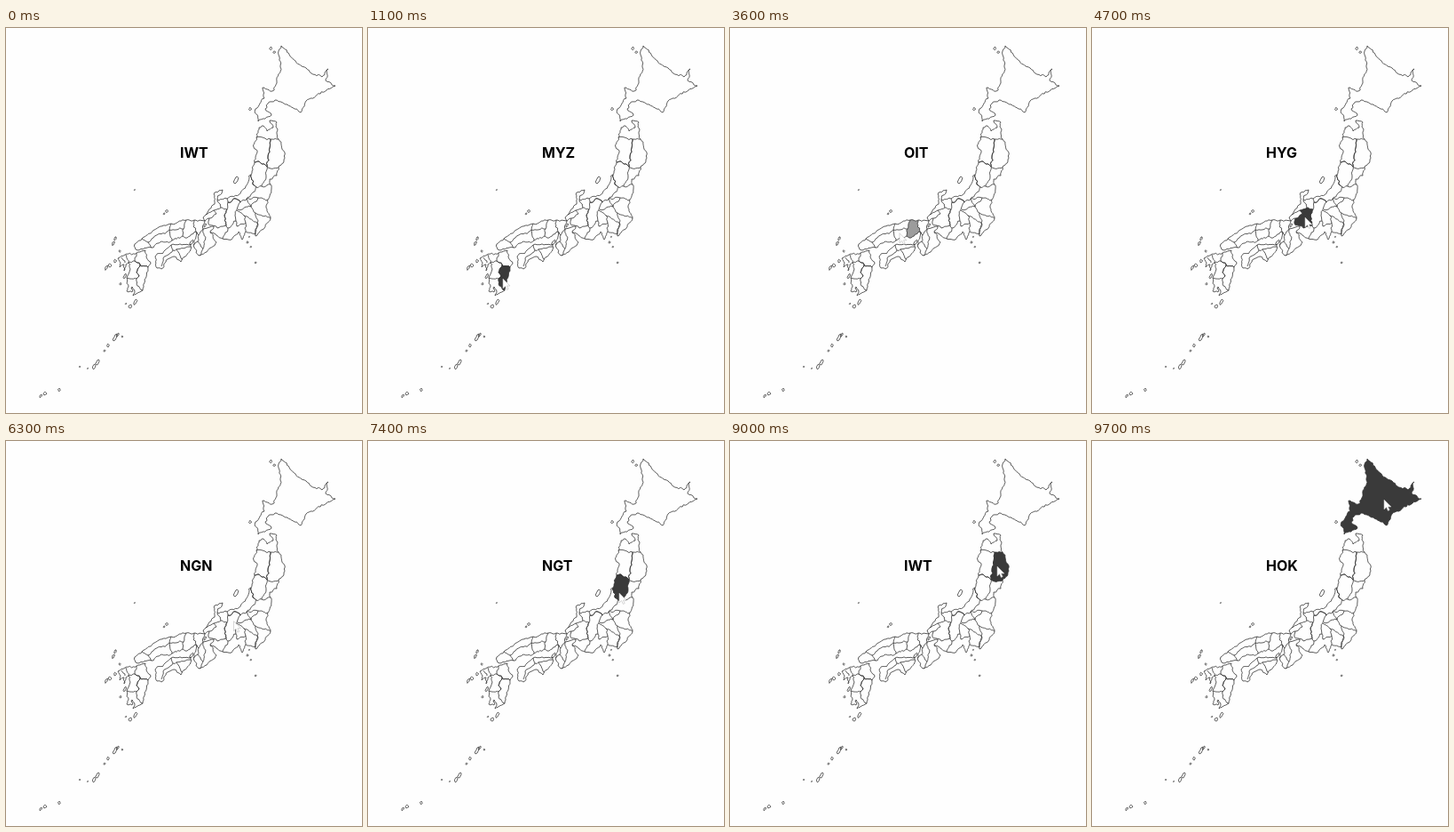
An HTML page for the animation above (10000 ms loop, 401 by 433 pixels).

```html
<!DOCTYPE html>
<html lang="en">
<head>
<meta charset="utf-8">
<title>Prefecture map</title>
<style>
  html, body { margin: 0; width: 100%; height: 100%; overflow: hidden; background: #fefefe; }
  svg { display: block; width: 401px; height: 433px; }
  .map { fill: none; stroke: #333; stroke-width: .8; stroke-linejoin: round; }
  polygon { fill: #3a3a3a; fill-opacity: 0; }
  text { font: 700 16px Inter, "Liberation Sans", sans-serif; fill: #000; }
  #cursor { fill: #fff; stroke: #bbb; stroke-width: .6; }
</style>
</head>
<body>
<svg viewBox="0 0 401 433">
  <!-- Hovered prefectures: fade in, fade out, label time, pointer tip -->
  <g class="map">
    <polygon data-on="600" data-off="1400" data-name="MYZ" data-at="1100" data-tip="152 282"
      points="151 266 160 269 154 295 148 290 147 282 150 279 147 275"/>
    <polygon data-on="1400" data-off="2400" data-name="KMT" data-at="2000" data-tip="144 270"
      points="138 264 145 262 151 266 147 275 150 279 147 282 136 281 140 271"/>
    <polygon data-on="2500" data-off="3300" data-name="OIT" data-at="3200" data-tip="152 257"
      points="147 253 157 250 158 257 163 265 160 269 151 266 145 262"/>
    <polygon data-on="3500" data-off="4200" data-name="HYG" data-at="4100" data-tip="204 222"
      points="203 216 212 216 211 220 214 229 204 236 199 234 200 226"/>
    <polygon data-on="4400" data-off="5100" data-name="GIF" data-at="4900" data-tip="240 213"
      points="234 205 242 202 249 204 246 211 248 222 238 225 228 220 229 214 237 209"/>
    <polygon data-on="5100" data-off="6100" data-name="NGN" data-at="5900" data-tip="254 208"
      points="250 196 259 192 264 196 261 201 258 211 259 217 250 225 248 222 246 211 249 204"/>
    <polygon data-on="6800" data-off="7200" data-name="NGT" data-at="7200" data-tip="265 184"
      points="276 165 270 178 264 186 249 192 250 196 259 192 264 196 271 192 280 184 282 179 278 176"/>
    <polygon data-on="7200" data-off="7700" data-name="YGT" data-at="7700" data-tip="283 171"
      points="280 151 285 150 294 156 293 167 288 178 282 179 278 176 276 165"/>
    <polygon data-on="7700" data-off="8300" data-name="AKT" data-at="8200" data-tip="288 138"
      points="282 123 298 125 297 135 295 145 294 156 285 150 280 151 283 138 279 134"/>
    <polygon data-on="8400" data-off="9300" data-name="IWT" data-at="9000" data-tip="301 141"
      points="298 125 307 125 314 140 313 150 307 157 298 158 294 156 295 145 297 135"/>
    <polygon data-on="9500" data-off="10000" data-name="HOK" data-at="9700" data-tip="329 66"
      points="307 26 310 20 326 37 344 51 356 55 363 46 360 59 371 65 361 70 338 82 332 95 317 86 303 81
      295 85 292 91 299 98 284 105 281 91 291 79 289 67 300 71 305 62 309 44"/>
  </g>
  <!-- Coasts -->
  <g class="map">
    <polyline points="307 125 304 111 305 106 297 104 301 112 294 116 290 110 285 112 282 123"/>
    <polyline points="307 157 305 166 297 170 299 181 293 202 298 214 291 225 281 234 283 219 281 232 270 229"/>
    <polyline points="270 229 266 238 262 229 254 238 244 237 230 230 237 241 226 252 217 256 212 247 214 229"/>
    <polyline points="249 192 238 193 244 182 235 185 235 198 222 213 224 217 212 216"/>
    <polyline points="203 216 186 220 172 224 153 237 145 243 146 249 164 247 172 242 187 239 199 234"/>
    <polyline points="168 257 179 250 186 244 208 243 208 249 197 263 190 257 182 260 175 271 170 270 168 257"/>
    <polyline points="136 281 138 291 136 296 142 297 142 291 145 296 143 301 154 295"/>
    <polyline points="147 253 134 255 126 259 129 264 128 269 133 266 133 273 135 266 138 264"/>
  </g>
  <!-- Inner borders -->
  <g class="map">
    <polyline points="288 178 298 176"/>
    <polyline points="271 192 284 191 295 193"/>
    <polyline points="271 192 276 201 261 204"/>
    <polyline points="284 191 276 201 281 208 298 214"/>
    <polyline points="260 205 268 211 283 219 281 208"/>
    <polyline points="268 211 270 219 260 223 259 217"/>
    <polyline points="270 219 270 229"/>
    <polyline points="250 225 244 237"/>
    <polyline points="234 223 230 230"/>
    <polyline points="238 193 242 202"/>
    <polyline points="225 210 234 205"/>
    <polyline points="229 214 224 217 222 226 217 233 216 240 222 248 218 256"/>
    <polyline points="234 223 222 226 224 239 222 248"/>
    <polyline points="214 229 217 233"/>
    <polyline points="216 240 211 244"/>
    <polyline points="200 226 184 227 186 220"/>
    <polyline points="187 239 184 227 166 236 160 241 153 237"/>
    <polyline points="160 241 164 247"/>
    <polyline points="186 244 188 250 208 246"/>
    <polyline points="175 268 177 259 188 250"/>
    <polyline points="192 249 199 260"/>
    <polyline points="135 255 138 264"/>
    <polyline points="130 258 134 264"/>
  </g>
  <!-- Islands: x y size -->
  <g class="map" id="isles">
    <g data-at="298 23 1.5, 302 27 1.4, 275 91 1.5, 259 171 4, 181 206 1.7, 178 209 1, 145 182 .6"/></g>
    <g data-at="123 237 2.6, 121 242 2.4, 128 251 1, 113 270 2.4, 117 267 1.8, 123 262 1.6, 129 288 1.2"/></g>
    <g data-at="134 279 2.5, 140 313 1.9, 146 308 3, 135 310 .7, 209 241 2.8, 224 222 2.3"/></g>
    <g data-at="123 348 3.4, 126 345 2, 131 347 .8, 115 357 1.5, 111 363 1"/></g>
    <g data-at="103 376 3, 99 381 2.8, 92 383 .6, 83 381 .7, 39 414 2, 44 411 1.8, 60 407 1.4"/></g>
    <g data-at="272 241 1, 276 246 .8, 274 235 .6, 281 264 .9"/></g>
  </g>
  <text id="label" x="196" y="145.5">IWT</text>
  <path id="cursor" d="M0 0V11L2.6 8.6 4.4 12.4 6.2 11.6 4.5 8H8Z"/>
</svg>
<script>
const FADE = 200, LOOP = 10000, STEP = 100;
const all = selector => [...document.querySelectorAll(selector)];
const nums = s => s.trim().split(/[\s,]+/).map(Number);
const clamp = v => Math.max(0, Math.min(1, v));
const noise = n => { const v = Math.sin(n) * 43758.5453; return v - Math.floor(v) - .5; };

// Adds small wiggles, identical on both sides of a shared edge
function edge(a, b) {
  const flip = a[0] > b[0] || (a[0] === b[0] && a[1] > b[1]);
  const [p, q] = flip ? [b, a] : [a, b];
  const dx = q[0] - p[0], dy = q[1] - p[1], len = Math.hypot(dx, dy);
  const count = Math.max(1, Math.round(len / 2));
  const seed = p[0] * 12.9 + p[1] * 78.2 + q[0] * 3.7 + q[1] * 9.1;
  const mids = [];
  for (let i = 1; i < count; i++) {
    const k = i / count;
    const bow = noise(seed) * Math.sin(k * Math.PI * 2) * Math.min(2.4, len / 6);
    const off = (bow + noise(seed + i * 5.3) * 1.5) / len;
    mids.push([p[0] + dx * k - dy * off, p[1] + dy * k + dx * off]);
  }
  if (flip) mids.reverse();
  return [...mids, b];
}

function roughen(shape) {
  const v = nums(shape.getAttribute("points"));
  const pts = [];
  for (let i = 0; i < v.length; i += 2) pts.push([v[i], v[i + 1]]);
  if (shape.tagName === "polygon") pts.push(pts[0]);
  const out = pts.flatMap((p, i) => i ? edge(pts[i - 1], p) : [p]);
  shape.setAttribute("points", out.map(p => p.map(n => n.toFixed(1)).join()).join(" "));
}

// Uneven ovals; larger ones are slim and lean north-east
function addIsle(x, y, r) {
  const line = document.createElementNS("http://www.w3.org/2000/svg", "polyline");
  const slim = r > 1.9 ? .45 : .85, pts = [];
  for (let i = 0; i <= 8; i++) {
    const angle = i * Math.PI / 4, size = r * (1 + noise(x + y * 7 + i % 8) * .6);
    const along = size * Math.cos(angle), across = size * slim * Math.sin(angle);
    pts.push([x + along * .45 + across * .9, y - along * .9 + across * .45].map(n => n.toFixed(1)));
  }
  line.setAttribute("points", pts.join(" "));
  document.getElementById("isles").append(line);
}

all("polygon, polyline").forEach(roughen);
all("[data-at*=',']").forEach(g => g.dataset.at.split(",").forEach(s => addIsle(...nums(s))));

const areas = all("polygon").map(shape => {
  const { on, off, at, name, tip } = shape.dataset;
  return { shape, on: +on, off: +off, at: +at, name, tip: nums(tip) };
});
const label = document.getElementById("label");
const cursor = document.getElementById("cursor");

// The pointer rests inside an area, then glides to the next one
function pointerAt(t) {
  let from = [178, 400], leave = STEP;
  for (const a of areas) {
    const arrive = a.on + FADE;
    if (t < arrive) {
      const k = clamp((t - leave) / (arrive - leave));
      return from.map((v, i) => v + (a.tip[i] - v) * k);
    }
    from = a.tip;
    leave = a.off;
  }
  return from;
}

function draw(t) {
  let text = "IWT";
  for (const a of areas) {
    a.shape.style.fillOpacity = clamp((t - a.on) / FADE) - clamp((t - a.off) / FADE);
    if (t >= a.at) text = a.name;
  }
  if (label.textContent !== text) label.textContent = text;
  cursor.style.display = t < STEP ? "none" : "";
  cursor.setAttribute("transform", `translate(${pointerAt(t).join(" ")})`);
}

const start = performance.now();
function tick() {
  const t = (performance.now() - start) % LOOP;
  draw(Math.floor(t / STEP) * STEP);
  requestAnimationFrame(tick);
}
tick();
</script>
</body>
</html>
```
